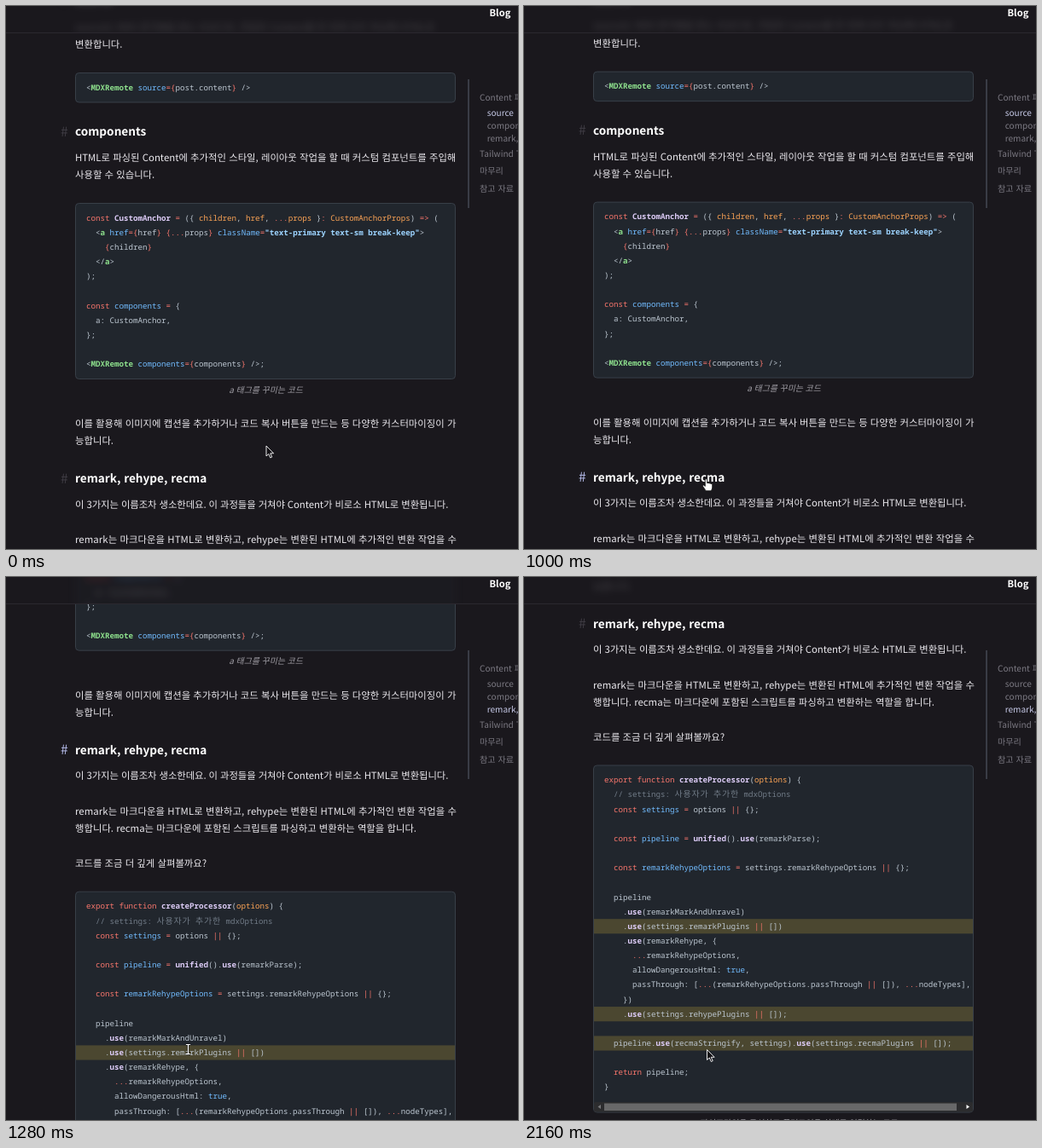
Write an HTML page that moves like this. It is 600 px wide and 637 px high and loops after 2.24 s.

```html
<!DOCTYPE html>
<html lang="ko">
<head>
<meta charset="utf-8">
<title>MDX post</title>
<style>
html, body { margin: 0; width: 100%; height: 100%; overflow: hidden; background: #1a181d; }
svg { display: block; width: 100vw; height: 100vh; }
text { white-space: pre; text-rendering: geometricPrecision; font-family: "Noto Sans CJK KR", "Noto Sans CJK", sans-serif; }
.body { font-size: 11.38px; fill: #ebe9ee; }
.head { font-size: 13.6px; font-weight: 700; fill: #fff; }
.hash { font-size: 15.6px; fill: #403d45; }
.note { font-size: 9.9px; font-style: italic; fill: #a09ea5; text-anchor: middle; }
.toc { font-size: 10.1px; fill: #7b7982; }
.code { font-family: "Noto Sans Mono", "DejaVu Sans Mono", monospace; font-size: 9.18px; font-weight: 500; fill: #bcc6d0; }
.box { fill: #21262d; stroke: #383f48; }
.mark { fill: #4b4730; }
.r { fill: #f8766c; }
.o { fill: #fba355; }
.b { fill: #72bcff; }
.g { fill: #8ddf8c; font-weight: 600; }
.f { fill: #dccbf6; font-weight: 600; }
.s { fill: #9cd3ff; font-weight: 600; }
.c { fill: #717b87; }
.k { fill: #717b87; font-family: "Noto Sans CJK KR", "Noto Sans CJK", sans-serif; font-size: 10px; font-weight: 400; letter-spacing: .8px; }
</style>
</head>
<body>
<svg id="stage" viewBox="0 0 600 637" preserveAspectRatio="none">
  <defs>
    <clipPath id="below"><rect y="32" width="600" height="605"/></clipPath>
    <clipPath id="bar"><rect width="600" height="31"/></clipPath>
    <filter id="blur" filterUnits="userSpaceOnUse" x="0" y="-20" width="600" height="80">
      <feGaussianBlur stdDeviation="4.5"/>
    </filter>
  </defs>
  <rect width="600" height="637" fill="#1a181d"/>
  <g clip-path="url(#below)"><g id="page"></g></g>
  <g clip-path="url(#bar)"><g filter="url(#blur)" opacity=".22"><use href="#page"/></g></g>
  <rect y="31" width="600" height="1" fill="#2b282f"/>
  <text x="566.5" y="12" class="head" style="font-size:11.2px">Blog</text>
  <g id="side"><rect x="541.3" y="86" width="1.5" height="151" fill="#454954"/></g>
  <g id="pointer" stroke-linejoin="round">
    <path id="arrow" d="M0 0V12L2.8 9.5 4.8 14 6.7 13.1 4.8 8.8H8.6Z" fill="#121014" stroke="#fff" stroke-width=".9"/>
    <path id="hand" d="M-1.2 .8Q0-.8 1.2 .8V5Q2.4 4 3.4 5.2 4.6 4.4 5.5 5.7 7 5.2 7.2 6.8V10Q7 12 5.8 14H-.6Q-1.4 11.6-3.8 9 -4.6 7.4-3 7.2L-1.2 8.6Z" fill="#fff" stroke="#111" stroke-width=".8"/>
    <g id="beam" fill="none">
      <path d="M-2.6-5.5H-.6L0-5 .6-5.5H2.6M0-5V5M-2.6 5.5H-.6L0 5 .6 5.5H2.6" stroke="#111" stroke-width="2"/>
      <path d="M-2.6-5.5H-.6L0-5 .6-5.5H2.6M0-5V5M-2.6 5.5H-.6L0 5 .6 5.5H2.6" stroke="#fff" stroke-width="1.2"/>
    </g>
  </g>
</svg>
<script>
const LOOP = 2240, STEP = 40, CHAR = 5.508, LINE = 17.15;
const NS = "http://www.w3.org/2000/svg";
const $ = id => document.getElementById(id);
const page = $("page"), side = $("side");

function add(parent, tag, attrs, text) {
  const el = document.createElementNS(NS, tag);
  for (const key in attrs) el.setAttribute(key, attrs[key]);
  if (text) el.textContent = text;
  return parent.appendChild(el);
}
const write = (cls, x, y, text) => add(page, "text", { class: cls, x, y }, text);
const rect = (cls, x, y, width, height, more) =>
  add(page, "rect", { class: cls, x, y, width, height, ...more });

function heading(y, text) {
  write("head", 81, y, text);
  return write("hash", 64, y + .8, "#");
}

// «rtext» puts text in the token class r
function code(y, height, source, marked = []) {
  rect("box", 81.5, y, 445, height, { rx: 4 });
  source.split("\n").forEach((line, i) => {
    const base = y + 20.3 + i * LINE;
    if (marked.includes(i)) rect("mark", 82, base - 11.6, 444, LINE);
    const body = line.trimStart();
    const el = write("code", 93.9 + (line.length - body.length) * CHAR, base);
    body.split(/(«.*?»)/).forEach(part => {
      if (part[0] === "«") add(el, "tspan", { class: part[1] }, part.slice(2, -1));
      else if (part) add(el, "tspan", {}, part);
    });
  });
}

heading(-1, "source");
write("body", 81, 28.6, "source는 MDX 문자열을 받는 속성으로, 전달된 Content를 한 번에 모두 파싱해 HTML로");
write("body", 81, 49, "변환합니다.");
code(78.5, 34.5, "<«gMDXRemote» «bsource»«r={»post.content«r}» />");

heading(152, "components");
write("body", 81, 182, "HTML로 파싱된 Content에 추가적인 스타일, 레이아웃 작업을 할 때 커스텀 컴포넌트를 주입해");
write("body", 81, 202.2, "사용할 수 있습니다.");
code(231.5, 206, `«rconst» «fCustomAnchor» «r=» ({ «ochildren», «ohref», «r...»«oprops» }«r:» «oCustomAnchorProps») «r=>» (
  <«ga» «bhref»«r={»href«r}» «r{...»props«r}» «bclassName»«r=»«s"text-primary text-sm break-keep"»>
    «r{»children«r}»
  </«ga»>
);

«rconst» «bcomponents» «r=» {
  a: CustomAnchor,
};

<«gMDXRemote» «bcomponents»«r={»components«r}» />;`);
write("note", 304.5, 453.8, "a 태그를 꾸미는 코드");
write("body", 81, 494.2, "이를 활용해 이미지에 캡션을 추가하거나 코드 복사 버튼을 만드는 등 다양한 커스터마이징이 가");
write("body", 81, 514.4, "능합니다.");

const hash = heading(559, "remark, rehype, recma");
write("body", 81, 588.5, "이 3가지는 이름조차 생소한데요. 이 과정들을 거쳐야 Content가 비로소 HTML로 변환됩니다.")
  .style.letterSpacing = "-.09px";
write("body", 81, 630, "remark는 마크다운을 HTML로 변환하고, rehype는 변환된 HTML에 추가적인 변환 작업을 수")
  .style.letterSpacing = ".07px";
write("body", 81, 650.3, "행합니다. recma는 마크다운에 포함된 스크립트를 파싱하고 변환하는 역할을 합니다.");
write("body", 81, 691.3, "코드를 조금 더 깊게 살펴볼까요?");
code(720.5, 407, `«rexport function» «fcreateProcessor»(«ooptions») {
  «c// settings: »«k사용자가»«c »«k추가한»«c mdxOptions»
  «rconst» «bsettings» «r=» options «r||» {};

  «rconst» «bpipeline» «r=» «funified»().«fuse»(remarkParse);

  «rconst» «bremarkRehypeOptions» «r=» settings.remarkRehypeOptions «r||» {};

  pipeline
    .«fuse»(remarkMarkAndUnravel)
    .«fuse»(settings.remarkPlugins «r||» [])
    .«fuse»(remarkRehype, {
      «r...»remarkRehypeOptions,
      allowDangerousHtml: «btrue»,
      passThrough: [«r...»(remarkRehypeOptions.passThrough «r||» []), «r...»nodeTypes],
    })
    .«fuse»(settings.rehypePlugins «r||» []);

  pipeline.«fuse»(recmaStringify, settings).«fuse»(settings.recmaPlugins «r||» []);

  «rreturn» pipeline;
}`, [10, 16, 18]);
rect("", 82, 1115.5, 444, 11.5, { fill: "#2c2c2e", rx: 2 });
rect("", 94, 1117, 413, 8.5, { fill: "#686869" });
add(page, "path", { d: "M90 1118.5v5l-3.5-2.5z", fill: "#77777a" });
add(page, "path", { d: "M518.5 1118.5v5l3.5-2.5z", fill: "#fff" });
write("note", 321, 1143.5, "파이프라인을 구성하고 플러그인을 차례로 연결하는 코드");

const toc = [
  [555, 110.6, "Content 파싱"], [563.7, 128.8, "source"], [563.7, 143.8, "components"],
  [563.7, 158.8, "remark, rehype, recma"], [555, 176.6, "Tailwind Typography"],
  [555, 197.2, "마무리"], [555, 217.8, "참고 자료"]
].map(([x, y, label]) => add(side, "text", { class: "toc", x, y }, label));

const clamp = v => Math.min(1, Math.max(0, v));
const ramp = (t, a, b) => clamp((t - a) / (b - a));
const mix = (a, b, k) => `rgb(${a.map((v, i) => Math.round(v + (b[i] - v) * k))})`;
const GREY = [123, 121, 130], DIM = [64, 61, 69], LILAC = [181, 187, 234], PALE = [196, 199, 229];

function ease(x, x1, x2) {
  let lo = 0, hi = 1, u = x;
  for (let i = 0; i < 24; i++) {
    u = (lo + hi) / 2;
    const at = 3 * (1 - u) ** 2 * u * x1 + 3 * (1 - u) * u * u * x2 + u ** 3;
    if (at < x) lo = u; else hi = u;
  }
  return u * u * (3 - 2 * u);
}

// time, x, y of the pointer
const path = [
  [0, 305, 516], [400, 274, 527.5], [600, 238, 544], [720, 213.5, 554.8], [1160, 213.5, 554.8],
  [1280, 213.5, 554], [1400, 213, 555.5], [1680, 213, 555.5], [1720, 214.5, 554.5], [LOOP, 214.5, 554.5]
];
function pointerAt(t) {
  const i = path.findIndex(p => p[0] > t);
  const a = path[i - 1], b = path[i], k = ramp(t, a[0], b[0]);
  return [a[1] + (b[1] - a[1]) * k, a[2] + (b[2] - a[2]) * k];
}

function draw(t) {
  const scroll = t < 987 ? 0 : 499.5 * ease(ramp(t, 987, 1432), .3135, .7215);
  page.setAttribute("transform", `translate(0 ${-scroll.toFixed(2)})`);

  const hover = t < 1000 ? ramp(t, 600, 720) : 1 - ramp(t, 1280, 1420);
  hash.style.fill = mix(DIM, LILAC, hover);
  const active = ramp(t, 1140, 1270);
  toc[1].style.fill = mix(PALE, GREY, active);
  toc[3].style.fill = mix(GREY, PALE, active);
  toc[1].style.fontWeight = active < .5 ? 500 : 400;
  toc[3].style.fontWeight = active < .5 ? 400 : 500;

  const shape = t < 640 || t >= 1400 ? "arrow" : t < 1240 ? "hand" : "beam";
  for (const id of ["arrow", "hand", "beam"]) $(id).style.display = id === shape ? "" : "none";
  $("pointer").setAttribute("transform", `translate(${pointerAt(t)})`);
}

const start = performance.now();
function tick() {
  const t = (performance.now() - start) % LOOP;
  draw(Math.floor(t / STEP) * STEP);
  requestAnimationFrame(tick);
}
draw(0);
requestAnimationFrame(tick);
</script>
</body>
</html>
```
